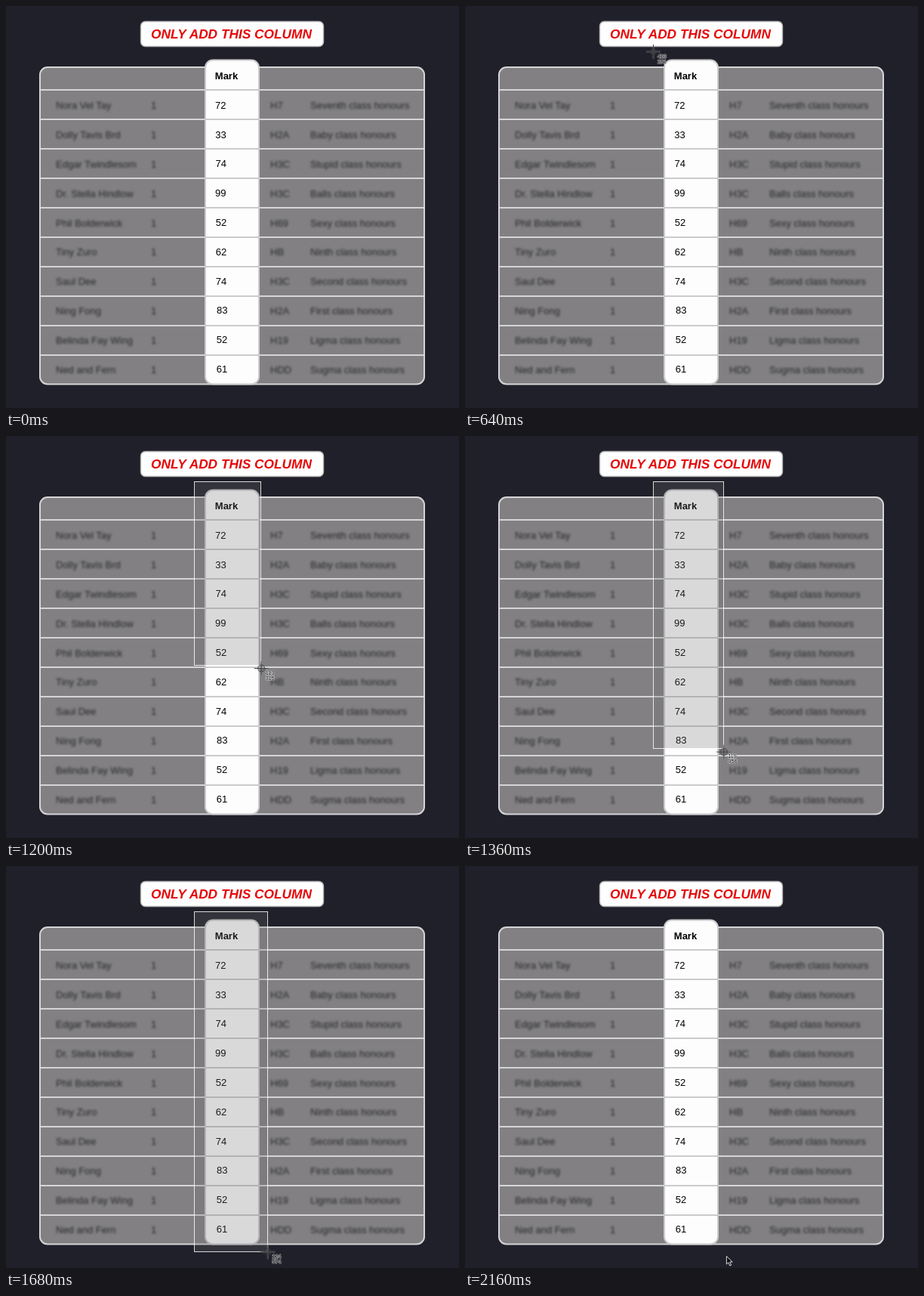
Write an HTML page that moves like this. It is 600 px wide and 532 px high and loops after 2.28 s.

```html
<!DOCTYPE html>
<html lang="en">
<head>
<meta charset="utf-8">
<title>Only add this column</title>
<style>
  html, body { margin: 0; width: 100%; height: 100%; overflow: hidden; background: #20202a; }
  svg { display: block; width: 600px; height: 532px; font: 13px "Liberation Sans", Arial, sans-serif; }
  .title { font: italic bold 17.3px "Liberation Sans", Arial, sans-serif; fill: #e60505; }
  .head { font-weight: bold; }
  .line { stroke: #d5d5d7; stroke-width: 2; fill: none; }
  .edge { stroke: #cbcbcd; }
  .blur { filter: blur(1.6px); fill: #252527; }
  .label { font-size: 7.2px; fill: #1c1c1e; stroke: rgba(255, 255, 255, .65); stroke-width: 1.2; paint-order: stroke; }
</style>
</head>
<body>
<svg viewBox="0 0 600 532">
  <rect width="600" height="532" fill="#20202a"/>
  <rect x="178.5" y="20.5" width="242" height="33" rx="6" fill="#fefefe" stroke="#b4b2b4" stroke-width="1.4"/>
  <text class="title" x="298.5" y="43.3" text-anchor="middle">ONLY ADD THIS COLUMN</text>

  <rect class="line" x="45" y="81" width="509" height="419.5" rx="10" style="fill:#828083"/>
  <path class="line" id="rules"/>
  <g class="blur" id="hidden"></g>
  <rect class="line edge" x="264" y="71.5" width="71" height="429" rx="10" style="fill:#fdfdfd"/>
  <path class="line edge" id="columnRules"/>
  <g id="marks"><text class="head" x="276.8" y="97">Mark</text></g>

  <rect id="area" x="249.5" y="60.5" fill="rgba(110,110,110,.25)" stroke="rgba(255,255,255,.82)"/>
  <g id="cross">
    <path d="M-9.5 0H9.5M0-9.5V9.5" stroke="rgba(255,255,255,.22)" stroke-width="2.4"/>
    <circle r="4.7" fill="rgba(70,70,72,.3)" stroke="rgba(50,50,52,.75)" stroke-width=".9"/>
    <path d="M-9.5 0H9.5M0-9.5V9.5" stroke="#3a3a3d" stroke-width="1"/>
    <text class="label" id="labelX" x="5.6" y="8.2"></text>
    <text class="label" id="labelY" x="5.6" y="15"></text>
  </g>
  <path id="arrow" transform="translate(346 516)" d="M.4 .3V11L2.9 8.7L4.7 12.9L6.6 12.1L4.8 8H8.2Z"
        fill="#0c0c0e" stroke="#f0f0f2" stroke-width=".9" stroke-linejoin="round"/>
</svg>
<script>
  const $ = id => document.getElementById(id);
  const LOOP = 2280, STEP = 40, SCALE = 0.784;
  const ORIGIN = [249, 60], DRAG = 700, RELEASE = 1820;

  // name, mark, mark x, code, class
  const rows = [
    ["Nora Vel Tay", 72, 277, "H7", "Seventh"],
    ["Dolly Tavis Brd", 33, 277.3, "H2A", "Baby"],
    ["Edgar Twindlesom", 74, 277.5, "H3C", "Stupid"],
    ["Dr. Stella Hindlow", 99, 277, "H3C", "Balls"],
    ["Phil Bolderwick", 52, 277.7, "H69", "Sexy"],
    ["Tiny Zuro", 62, 277.7, "HB", "Ninth"],
    ["Saul Dee", 74, 277.7, "H3C", "Second"],
    ["Ning Fong", 83, 279, "H2A", "First"],
    ["Belinda Fay Wing", 52, 278.7, "H19", "Ligma"],
    ["Ned and Fern", 61, 278.7, "HDD", "Sugma"]
  ];

  function addText(parent, x, y, value) {
    const el = document.createElementNS("http://www.w3.org/2000/svg", "text");
    el.setAttribute("x", x);
    el.setAttribute("y", y);
    el.textContent = value;
    parent.append(el);
  }

  let rules = "", columnRules = "";
  rows.forEach(([name, mark, markX, code, grade], i) => {
    const y = 111 + 39 * i, base = 135.8 + 38.8 * i;
    rules += `M45 ${y}H554`;
    columnRules += `M264 ${y}H335`;
    addText($("hidden"), 66, base + 0.6, name);
    addText($("hidden"), 192, base + 0.6, 1);
    addText($("hidden"), 350, base + 0.6, code);
    addText($("hidden"), 403, base + 0.6, grade + " class honours");
    addText($("marks"), markX, base, mark);
  });
  $("rules").setAttribute("d", rules);
  $("columnRules").setAttribute("d", columnRules);

  // time, x, y of the pointer
  const path = [
    [0, 305, -24], [160, 284, 12], [400, 254, 50], [560, 249, 60], [DRAG, 249, 60],
    [920, 289, 154], [1120, 331, 271], [1200, 337.7, 307], [1360, 342.3, 417.6],
    [1520, 344.8, 480], [1680, 346.3, 510.2], [1800, 346.3, 516], [LOOP, 346.3, 516]
  ];

  const slope = (i, k) => (path[i + 1][k] - path[i][k]) / (path[i + 1][0] - path[i][0]);

  function tangent(i, k) {
    if (i === 0) return slope(0, k);
    if (i === path.length - 1) return 0;
    const a = slope(i - 1, k), b = slope(i, k);
    return a * b > 0 ? 2 * a * b / (a + b) : 0;
  }

  // Monotone cubic interpolation along the path
  function pointer(t) {
    let i = 0;
    while (i < path.length - 2 && t >= path[i + 1][0]) i++;
    const span = path[i + 1][0] - path[i][0];
    const u = (t - path[i][0]) / span, v = 1 - u;
    return [1, 2].map(k =>
      path[i][k] * (1 + 2 * u) * v * v + path[i + 1][k] * u * u * (3 - 2 * u) +
      span * u * v * (tangent(i, k) * v - tangent(i + 1, k) * u));
  }

  const show = (el, on) => { el.style.display = on ? "" : "none"; };

  function draw(t) {
    const p = pointer(t);
    const dragging = t > DRAG && t < RELEASE;
    show($("cross"), t >= STEP && t < RELEASE);
    show($("area"), dragging);
    show($("arrow"), t >= RELEASE);
    $("cross").setAttribute("transform", `translate(${p[0] + 0.5} ${p[1] + 0.5})`);

    // The selected area trails the pointer slightly
    if (dragging) {
      const corner = pointer(t - 8);
      $("area").setAttribute("width", Math.round(corner[0] - ORIGIN[0]));
      $("area").setAttribute("height", Math.round(corner[1] - ORIGIN[1]));
    }

    const base = dragging ? [0, 0] : [423, 281];
    ["labelX", "labelY"].forEach((id, k) => {
      $(id).textContent = Math.round(base[k] + (p[k] - ORIGIN[k]) / SCALE);
    });
  }

  function tick() {
    draw(Math.floor(performance.now() % LOOP / STEP) * STEP);
    requestAnimationFrame(tick);
  }
  tick();
</script>
</body>
</html>
```
